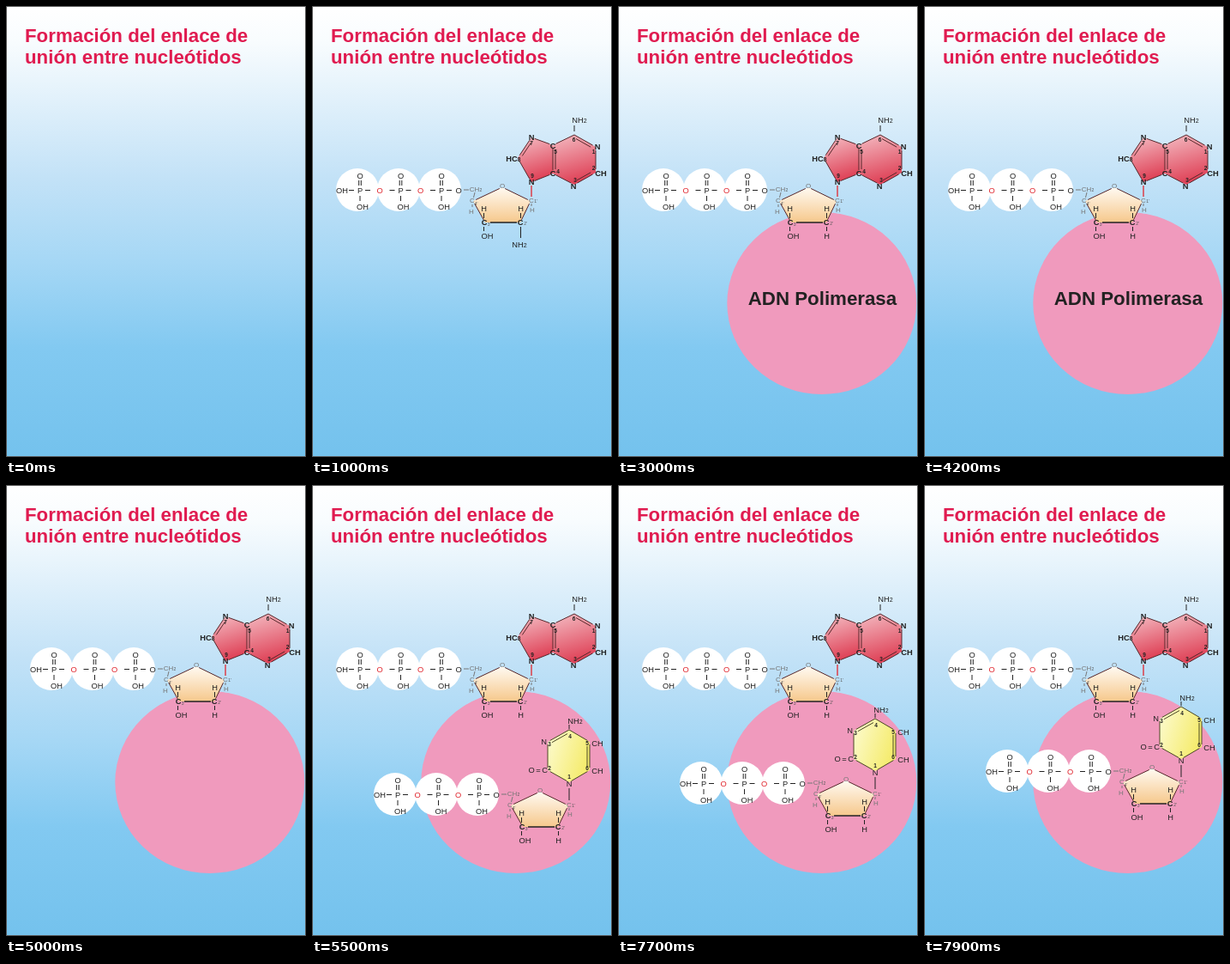
These frames come from a looping animation (350x525 px, 8 s). An HTML page:

```html
<!DOCTYPE html>
<html lang="es">
<head>
<meta charset="utf-8">
<title>Enlace entre nucleótidos</title>
<style>
  html, body { margin: 0; width: 100%; height: 100%; overflow: hidden; }
  svg { display: block; width: 350px; height: 525px; }
  text { font-family: "Liberation Sans", Arial, sans-serif; font-size: 9.3px; fill: #222; }
  .mid { text-anchor: middle; }
  .bold { font-weight: bold; }
  .title { font-size: 22.3px; font-weight: bold; fill: #e01b50; }
  .label { font-size: 22.3px; font-weight: bold; }
  .num { font-size: 6.5px; font-weight: bold; }
  .sub { font-size: 7px; }
  .grey { font-size: 8px; fill: #777; }
  .tiny { font-size: 5px; fill: #555; }
  .red { fill: #e0262e; }
  line { stroke: #222; stroke-width: 1; }
  line.pale { stroke: #777; }
  line.link { stroke: #e0262e; stroke-width: 1.3; }
  line.ring { stroke: #57282c; }
  line.olive { stroke: #4a4824; }
  line.thick { stroke-width: 1.5; }
</style>
</head>
<body>
<svg id="stage" viewBox="0 0 350 525">
  <defs>
    <linearGradient id="sky" x2="0" y2="1">
      <stop offset="0" stop-color="#fff"/>
      <stop offset=".08" stop-color="#f8fcfe"/>
      <stop offset=".38" stop-color="#c3e2f7"/>
      <stop offset=".57" stop-color="#a5d7f5"/>
      <stop offset=".76" stop-color="#82c9f1"/>
      <stop offset="1" stop-color="#74c2ed"/>
    </linearGradient>
    <linearGradient id="rose" x2=".25" y2="1">
      <stop offset="0" stop-color="#f4bcc3"/>
      <stop offset="1" stop-color="#df4459"/>
    </linearGradient>
    <linearGradient id="peach" x2="0" y2="1">
      <stop offset="0" stop-color="#fffaf2"/>
      <stop offset="1" stop-color="#f6c88c"/>
    </linearGradient>
    <linearGradient id="lemon" x2="1" y2=".4">
      <stop offset="0" stop-color="#fdfbd2"/>
      <stop offset="1" stop-color="#f5ec70"/>
    </linearGradient>
  </defs>
  <rect width="350" height="525" fill="url(#sky)"/>
  <text class="title" x="22" y="42">Formación del enlace de</text>
  <text class="title" x="22" y="67">unión entre nucleótidos</text>
  <g id="enzyme">
    <ellipse cx="237.8" cy="346" rx="110.5" ry="106" fill="#f09abd"/>
    <text id="enzymeName" class="label" x="151.7" y="348">ADN Polimerasa</text>
  </g>
  <g id="first"></g>
  <g id="second"></g>
  <rect x=".5" y=".5" width="349" height="524" fill="none" stroke="#555"/>
</svg>
<script>
const byId = id => document.getElementById(id);

const text = (x, y, s, cls = "") => `<text class="mid ${cls}" x="${x}" y="${y}">${s}</text>`;
const line = (x1, y1, x2, y2, cls = "") =>
  `<line class="${cls}" x1="${x1}" y1="${y1}" x2="${x2}" y2="${y2}"/>`;
const amine = (x, y) => text(x, y, 'NH<tspan class="sub">2</tspan>');

// Bond between two atoms, trimmed at each end and optionally shifted sideways.
function bond(a, b, trimA, trimB, shift, cls) {
  const [dx, dy] = [b[0] - a[0], b[1] - a[1]];
  const len = Math.hypot(dx, dy), ux = dx / len, uy = dy / len;
  return line(
    a[0] + ux * trimA - uy * shift, a[1] + uy * trimA + ux * shift,
    b[0] - ux * trimB - uy * shift, b[1] - uy * trimB + ux * shift, cls);
}

const area = (points, fill) => `<polygon points="${points.join(" ")}" fill="url(#${fill})"/>`;

function phosphates() {
  let out = "";
  for (let i = 0; i < 3; i++) out += `<circle cx="${53 + 48 * i}" cy="214" r="25" fill="#fff"/>`;
  out += text(35, 218, "OH");
  for (let i = 0; i < 3; i++) {
    const x = 56 + 47.5 * i;
    out += text(x, 201, "O") + line(x - 1.3, 203, x - 1.3, 209) + line(x + 1.3, 203, x + 1.3, 209)
      + text(x, 218, "P") + line(x, 221, x, 227) + text(x + 3, 237, "OH")
      + line(x - 13, 214.5, x - 7, 214.5) + line(x + 6, 214.5, x + 12, 214.5);
    if (i < 2) out += text(x + 23, 218, "O", "red");
  }
  return out + text(171, 218, "O") + line(177, 214, 183, 214, "pale")
    + text(191, 216, 'CH<tspan class="tiny">2</tspan>', "grey");
}

function sugar(tail) {
  const pts = [[222, 211], [255, 227], [243, 252], [202, 252], [188, 227]];
  let out = area(pts, "peach");
  pts.forEach((p, i) => {
    const bottom = i === 2;
    out += bond(p, pts[(i + 1) % 5], bottom ? 4 : 3.5, bottom ? 6 : 3.5, 0, bottom ? "thick" : "ring");
  });
  out += text(222, 212, "O", "grey") + line(190, 217, 188.5, 223, "pale")
    + text(187, 229, "C", "grey") + text(191.5, 232, "4'", "tiny")
    + line(187, 231, 187, 234, "pale") + text(186, 242, "H", "grey")
    + text(256, 229, "C", "grey") + text(261, 229, "1'", "tiny")
    + line(256, 230, 256, 233, "pale") + text(257, 240, "H", "grey")
    + text(201, 255, "C", "bold") + text(206.5, 256, "3'", "tiny")
    + text(243, 255, "C", "bold") + text(249, 255, "2'", "tiny");
  for (const x of [200.5, 243.5])
    out += text(x, 239, "H") + line(x, 241, x, 247) + line(x, 257, x, 262);
  return out + text(204.5, 271, "OH") + tail;
}

function adenine() {
  const n9 = [256, 205], c8 = [240, 177], n7 = [256, 153], c5 = [281, 162], c4 = [281, 195],
    n3 = [306, 208], c2 = [331, 194], n1 = [331, 164], c6 = [306, 150];
  const b = (p, q, s = 0, tp = 4, tq = 4) => bond(p, q, tp, tq, s, "ring");
  return area([n9, c8, n7, c5, c4], "rose") + area([c5, c4, n3, c2, n1, c6], "rose")
    + b(n9, c8) + b(c8, n7) + b(c8, n7, 3, 5, 5) + b(n7, c5) + b(c5, c4) + b(c5, c4, -3, 5, 5)
    + b(c4, n9) + b(c4, n3) + b(n3, c2) + b(n3, c2, -3, 5, 5) + b(c2, n1)
    + b(n1, c6, 0, 4, 0) + b(n1, c6, -3, 5, 4) + b(c6, c5, 0, 0, 4)
    + line(256, 209, 256, 222, "link") + line(306, 139, 306, 146) + amine(312, 136)
    + text(256, 156, "N", "bold") + text(256, 208, "N", "bold") + text(233, 180.5, "HC", "bold")
    + text(281, 165.5, "C", "bold") + text(281, 198, "C", "bold") + text(305, 212.5, "N", "bold")
    + text(333, 167, "N", "bold") + text(337, 198, "CH", "bold")
    + text(256, 162, "7", "num") + text(241.5, 181, "8", "num") + text(257, 200, "9", "num")
    + text(284, 172, "5", "num") + text(287, 195, "4", "num") + text(307, 205, "3", "num")
    + text(328.5, 191, "2", "num") + text(328.5, 172, "1", "num") + text(305.5, 158, "6", "num");
}

function cytosine() {
  const n1 = [300, 346], c2 = [275, 332], n3 = [275, 299], c4 = [300, 285],
    c5 = [324, 299], c6 = [324, 332];
  const b = (p, q, s = 0, tp = 3, tq = 3) => bond(p, q, tp, tq, s, "olive");
  return area([n1, c2, n3, c4, c5, c6], "lemon")
    + b(n1, c2) + b(c2, n3) + b(n3, c4, 0, 3, 0) + b(n3, c4, 3, 4, 4) + b(c4, c5, 0, 0, 3)
    + b(c5, c6) + b(c5, c6, 3, 5, 5) + b(c6, n1)
    + line(300, 353, 300, 367) + line(300, 279, 300, 284) + amine(307, 277.5)
    + text(300, 351, "N") + text(270.5, 302, "N") + text(256, 335, "O") + text(264, 335, "=")
    + text(271.5, 335, "C") + text(333, 304, "CH") + text(333, 335.5, "CH")
    + text(300, 342, "1", "num") + text(277, 332, "2", "num") + text(277, 304, "3", "num")
    + text(301, 295, "4", "num") + text(321, 303, "5", "num") + text(321, 332, "6", "num");
}

const freeTail = `<g id="amineTail">${line(243.5, 262, 243.5, 270) + amine(242, 281)}</g>`
  + `<g id="plainTail">${text(243.5, 271, "H")}</g>`;
byId("first").innerHTML = phosphates() + sugar(freeTail) + adenine();
byId("second").innerHTML =
  `<g transform="translate(44 146)">${phosphates() + sugar(text(243.5, 271, "H"))}</g>` + cytosine();

const show = (id, visible) => byId(id).setAttribute("visibility", visible ? "visible" : "hidden");

function render(t) {
  show("first", t >= 1000);
  byId("amineTail").style.display = t < 3000 ? "" : "none";
  byId("plainTail").style.display = t < 3000 ? "none" : "";
  byId("enzyme").style.display = t < 3000 ? "none" : "";
  show("enzymeName", t < 5000);
  show("second", t >= 5500);
  const rise = t >= 7900 ? 27 : t >= 7700 ? 13 : 0;
  byId("second").setAttribute("transform", `translate(0 ${-rise})`);
}

const start = performance.now();
function tick() {
  render((performance.now() - start) % 8000);
  requestAnimationFrame(tick);
}
tick();
</script>
</body>
</html>
```
